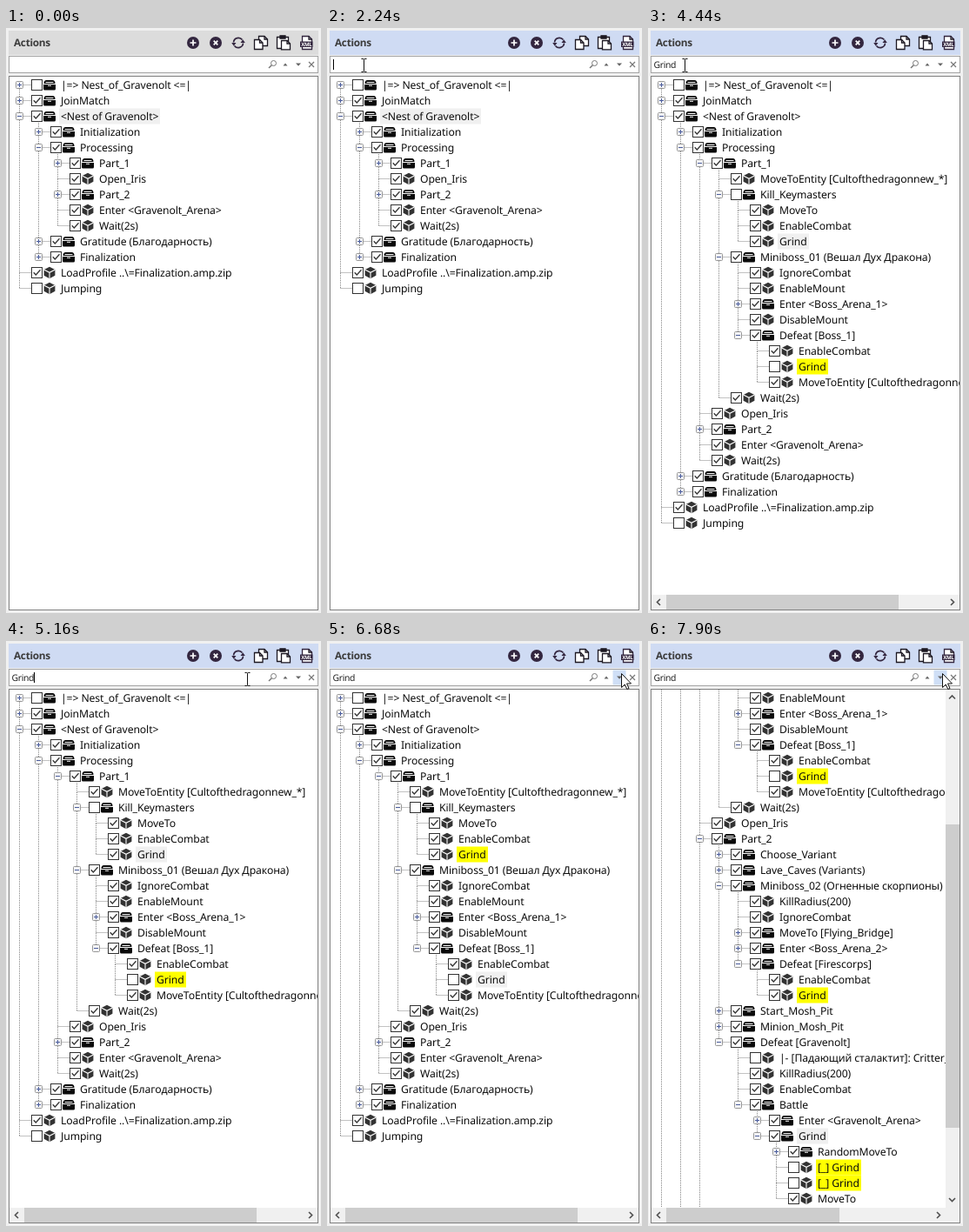
An HTML page for the animation above (8000 ms loop, 362 by 673 pixels).

```html
<!DOCTYPE html>
<html lang="en">
<head>
<meta charset="utf-8">
<title>Actions</title>
<style>
html, body { margin: 0; width: 362px; height: 673px; overflow: hidden; background: #f0f0f0; }
svg { display: block; }
text { font-family: "Noto Sans", "Open Sans", sans-serif; text-rendering: geometricPrecision; white-space: pre; }
#tree text { font-size: 12.2px; letter-spacing: -.1px; fill: #0c0c0c; }
.dots { stroke: #858585; stroke-dasharray: 1 1; fill: none; }
</style>
</head>
<body>
<svg id="stage" width="362" height="673" viewBox="0 0 362 673">
  <defs>
    <g id="box"><rect x="-6" y="-6" width="12" height="12" fill="#fff" stroke="#333"/></g>
    <g id="tick"><use href="#box"/><path d="M-3.8 -.2L-1.2 2.5L4 -3.2" fill="none" stroke="#333" stroke-width="1.3"/></g>
    <g id="plate"><rect x="-4" y="-4" width="8" height="8" rx="1" fill="#f6f6f6" stroke="#979797"/><path d="M-2.5 0H2.5" stroke="#4a5c9c"/></g>
    <g id="plus"><use href="#plate"/><path d="M0 -2.5V2.5" stroke="#4a5c9c"/></g>
    <g id="chest">
      <path d="M-6.5 -1.5Q-6.5 -5.5 -3.5 -5.5H3.5Q6.5 -5.5 6.5 -1.5Z" fill="#0a0a0a"/>
      <path d="M-7 -.5H7V4.5Q7 6 5.5 6H-5.5Q-7 6 -7 4.5Z" fill="#0a0a0a"/>
      <path d="M-4.5 -3H4.5M-2 .8H2" stroke="#fff"/>
    </g>
    <g id="cube">
      <path d="M0 -6.8L6.4 -3.6V3.2L0 6.8L-6.4 3.2V-3.6Z" fill="#333"/>
      <path d="M-6.4 -3.4L0 -.2L6.4 -3.4M0 -.2V6.8" fill="none" stroke="#fff" stroke-width="1.1"/>
    </g>
    <path id="beam" d="M-3 -7.5H-1Q0 -7.5 0 -6.5V6.5Q0 7.5 -1 7.5H-3M3 -7.5H1Q0 -7.5 0 -6.5M0 6.5Q0 7.5 1 7.5H3" fill="none" stroke="#111"/>
    <path id="arrow" d="M.5 .5V16.5L4.2 13L6.8 18.5L9 17.5L6.5 12H11.5Z" fill="#fff" stroke="#111"/>
  </defs>

  <rect id="head" x="3" y="3" width="356" height="28"/>
  <text x="9" y="21" font-size="11.8" font-weight="700" letter-spacing="-.28" fill="#3c3c3c">Actions</text>
  <g fill="#33263f" stroke="none">
    <circle cx="215" cy="17" r="7"/>
    <circle cx="241" cy="17" r="7"/>
  </g>
  <path d="M211.5 17H218.5M215 13.5V20.5M238.7 14.7L243.3 19.3M243.3 14.7L238.7 19.3" stroke="#fff" stroke-width="1.7"/>
  <g fill="none" stroke="#33263f" stroke-width="1.7">
    <path d="M261.5 16.5A5.6 5.6 0 0 1 271.5 13.5M272.5 17.5A5.6 5.6 0 0 1 262.5 20.5"/>
    <path d="M269.5 17L274.8 17L272.2 13.2ZM259.2 17L264.5 17L261.8 20.8Z" fill="#33263f" stroke="none"/>
  </g>
  <g fill="#fff" stroke="#1c1822" stroke-width="1.3">
    <path d="M290.5 9.5H297L300.5 13V20.5H290.5Z"/>
    <path d="M285.5 13.5H291.5L295 17V24.5H285.5Z"/>
    <path d="M291.5 13.5V17H295M297 9.5V13H300.5" fill="none"/>
    <path d="M311.5 10.5H324.5V23.5H311.5Z"/>
    <path d="M315 8.8H321V12H315Z" fill="#1c1822"/>
    <path d="M316.5 14.5H323L326.5 18V24.8H316.5Z"/>
    <path d="M323 14.5V18H326.5" fill="none"/>
    <path d="M340.5 9.5H348L351.5 13V24.5H340.5Z" stroke="#33263f"/>
    <path d="M348 9.5V13H351.5" fill="none"/>
    <rect x="338" y="15.5" width="14.5" height="6.5" fill="#33263f" stroke="none"/>
  </g>
  <text x="339.3" y="21" font-size="6" font-weight="700" letter-spacing="-.3" fill="#fff">XML</text>

  <rect x="3.5" y="32.5" width="355" height="19" fill="#fff" stroke="#a3a3a3"/>
  <rect id="hover" x="328.5" y="33.5" width="15" height="17"/>
  <g fill="none" stroke="#777">
    <circle cx="307.5" cy="40.5" r="3"/>
    <path d="M305.3 42.7L302 46" stroke-width="1.5"/>
    <path d="M348 39L354 45M354 39L348 45" stroke-width="1.2"/>
    <path d="M318.5 43.5L321 40.5L323.5 43.5ZM333 40.5H339L336 43.7Z" fill="#666" stroke="none"/>
  </g>
  <text id="query" x="6.6" y="46" font-size="10.4" letter-spacing="-.4" fill="#222"></text>
  <rect id="caret" y="36" width="1" height="12" fill="#000"/>

  <rect x="3.5" y="55.5" width="355" height="614" fill="#fff" stroke="#808080"/>
  <svg x="4" y="56" width="354" height="613" viewBox="4 56 354 613"><g id="tree"></g><g id="bars"></g></svg>
  <use id="pointer"/>
</svg>

<script>
const $ = id => document.getElementById(id);
const LOOP = 8000, ROW = 18, INDENT = 22, TOP = 65.5;

function add(parent, tag, attrs, text) {
  const n = document.createElementNS('http://www.w3.org/2000/svg', tag);
  for (const k in attrs) n.setAttribute(k, attrs[k]);
  if (text) n.textContent = text;
  parent.appendChild(n);
  return n;
}

// Each line: depth, expander (+ - or .), checked (x or o), label
const lines = s => s.trim().split('\n');
const HEAD = lines(`
0+o|=> Nest_of_Gravenolt <=|
0+xJoinMatch
0-x<Nest of Gravenolt>
1+xInitialization
1-xProcessing`);
const PART1 = lines(`
3.xMoveToEntity [Cultofthedragonnew_*]
3-oKill_Keymasters
4.xMoveTo
4.xEnableCombat
4.xGrind
3-xMiniboss_01 (Вешал Дух Дракона)
4.xIgnoreCombat
4.xEnableMount
4+xEnter <Boss_Arena_1>
4.xDisableMount
4-xDefeat [Boss_1]
5.xEnableCombat
5.oGrind
5.xMoveToEntity [Cultofthedragonnew_*]
3.xWait(2s)`);
const PART2 = lines(`
3+xChoose_Variant
3+xLave_Caves (Variants)
3-xMiniboss_02 (Огненные скорпионы)
4.xKillRadius(200)
4.xIgnoreCombat
4+xMoveTo [Flying_Bridge]
4+xEnter <Boss_Arena_2>
4-xDefeat [Firescorps]
5.xEnableCombat
5.xGrind
3+xStart_Mosh_Pit
3+xMinion_Mosh_Pit`);
const BOSS = lines(`
4.o|- [Падающий сталактит]: Critter_Stalactite
4.xKillRadius(200)
4.xEnableCombat
4-xBattle
5+xEnter <Gravenolt_Arena>
5-xGrind
6+xRandomMoveTo
6.o[_] Grind
6.o[_] Grind
6.xMoveTo`);
const TAIL = lines(`
2.xEnter <Gravenolt_Arena>
2.xWait(2s)
1+xGratitude (Благодарность)
1+xFinalization
0.xLoadProfile ..\\=Finalization.amp.zip
0.oJumping`);

function buildRows(open) {
  const group = (at, head, kids) => open >= at ? [head.replace('+', '-'), ...kids] : [head];
  const part2 = [...PART2, ...group(3, '3+xDefeat [Gravenolt]', BOSS)];
  return [...HEAD, ...group(1, '2+xPart_1', PART1), '2.xOpen_Iris',
    ...group(2, '2+xPart_2', part2), ...TAIL]
    .map(s => ({ depth: +s[0], exp: s[1], on: s[2] === 'x', label: s.slice(3) }));
}

const VIEWS = [
  { at: 0, open: 0, picked: 2, found: [] },
  { at: 3700, open: 1, picked: 10, found: [18], hEnd: 288 },
  { at: 6140, open: 1, picked: 18, found: [10], hEnd: 288 },
  { at: 7040, open: 2, picked: 32, found: [10, 18], hEnd: 265, thumb: [73, 503] },
  { at: 7840, open: 3, picked: 41, found: [10, 18, 32, 43, 44], hEnd: 220, thumb: [211, 560], scroll: 13 }
];

function drawTree(view) {
  const tree = $('tree'), rows = buildRows(view.open);
  tree.replaceChildren();
  tree.setAttribute('transform', `translate(0 ${-ROW * (view.scroll || 0)})`);
  const links = add(tree, 'g', { class: 'dots' });
  const mid = i => TOP + ROW * i;
  rows.forEach((r, i) => {
    const dx = INDENT * r.depth, y = mid(i), x = 15.5 + dx;
    let j = i - 1;
    while (j >= 0 && rows[j].depth > r.depth) j--;
    if (j >= 0) add(links, 'path', { d: `M${x} ${mid(j) + (rows[j].depth < r.depth ? 7.5 : .5)}V${y}` });
    add(links, 'path', { d: `M${x} ${y}H${29 + dx}` });
    const put = (id, px) => add(tree, 'use', { href: '#' + id, x: px + dx, y });
    if (r.exp !== '.') put(r.exp === '+' ? 'plus' : 'plate', 15.5);
    put(r.on ? 'tick' : 'box', 35.5);
    put(r.exp === '.' ? 'cube' : 'chest', 50);
    const label = add(tree, 'text', { x: 63 + dx, y: y + 4.5 }, r.label);
    const fill = view.found.includes(i) ? '#ff0' : view.picked === i ? '#f0f0f0' : '';
    if (fill) {
      const back = add(tree, 'rect', { x: 61 + dx, y: y - 9, width: Math.round(label.getComputedTextLength()) + 4, height: 18, fill });
      tree.insertBefore(back, label);
    }
  });
}

function drawBars({ hEnd, thumb }) {
  const bars = $('bars');
  bars.replaceChildren();
  if (!hEnd) return;
  const block = (x, y, x2, y2, fill) => add(bars, 'rect', { x, y, width: x2 - x, height: y2 - y, fill });
  const chevron = (x, y, turn) => add(bars, 'path', {
    d: 'M-3.5 2L0 -1.5L3.5 2', fill: 'none', stroke: '#505050', 'stroke-width': 1.6,
    transform: `translate(${x} ${y}) rotate(${turn})`
  });
  block(4, 652, 358, 669, '#f0f0f0');
  block(21, 652, hEnd, 669, '#cdcdcd');
  chevron(12, 660.5, -90);
  chevron(thumb ? 334 : 350, 660.5, 90);
  if (!thumb) return;
  block(342, 56, 358, 652, '#f0f0f0');
  block(342, thumb[0], 358, thumb[1], '#cdcdcd');
  chevron(349.5, 64.5, 0);
  chevron(349.5, 643, 180);
}

// Pointer stops: time, x, y
const PATH = [
  [60, 66, 43], [300, 42.5, 45], [539, 42.5, 45], [540, 42.5, 43], [4440, 42.5, 43],
  [4680, 106, 54], [4900, 190, 63], [5100, 262, 50], [5220, 294, 37],
  [5400, 318, 31], [5600, 333, 34], [5820, 338, 37]
];
const KEYS = [2360, 2660, 2780, 2900, 3040];
const BLINKS = [240, 780, 1260, 1700, 2240, 3460, 3940, 4440, 4940, 5440, 6140, 6680, 7180, 7660];
const CLICKS = [[6080, 6200], [6980, 7100], [7780, 7900]];

function pointerAt(t) {
  if (t > 4440) t = 4440 + Math.floor((t - 4440) / 60) * 60;
  const i = PATH.findIndex(p => p[0] > t);
  if (i < 0) return PATH[PATH.length - 1].slice(1);
  const [t0, x0, y0] = PATH[i - 1], [t1, x1, y1] = PATH[i];
  const k = (t - t0) / (t1 - t0);
  return [x0 + (x1 - x0) * k, y0 + (y1 - y0) * k];
}

const show = (n, on) => n.setAttribute('visibility', on ? 'visible' : 'hidden');
let shown;

function draw(t) {
  const view = VIEWS.filter(v => v.at <= t).pop();
  if (view !== shown) {
    drawTree(view);
    drawBars(view);
    shown = view;
  }
  $('head').setAttribute('fill', t < 240 ? '#dcdcdc' : '#cfdbf3');

  const typed = 'Grind'.slice(0, KEYS.filter(k => k <= t).length);
  $('query').textContent = typed;
  $('caret').setAttribute('x', 7 + (typed ? Math.round($('query').getComputedTextLength()) : 0));
  show($('caret'), BLINKS.filter(b => b <= t).length % 2);

  const visible = t >= 60 && (t < 2360 || t >= 3520);
  show($('pointer'), visible);
  let over = false;
  if (visible) {
    const [x, y] = pointerAt(t).map(Math.round);
    const inField = y > 32 && y < 53 && x < 300;
    $('pointer').setAttribute('href', inField ? '#beam' : '#arrow');
    $('pointer').setAttribute('transform', `translate(${x + (inField ? -.5 : 0)} ${y})`);
    over = x >= 328 && y > 32;
  }
  const pressed = CLICKS.some(([a, b]) => t >= a && t < b);
  $('hover').setAttribute('fill', pressed ? '#a9c6ee' : '#cfdff6');
  show($('hover'), over);
}

function tick() {
  draw(performance.now() % LOOP);
  requestAnimationFrame(tick);
}
tick();
</script>
</body>
</html>
```
